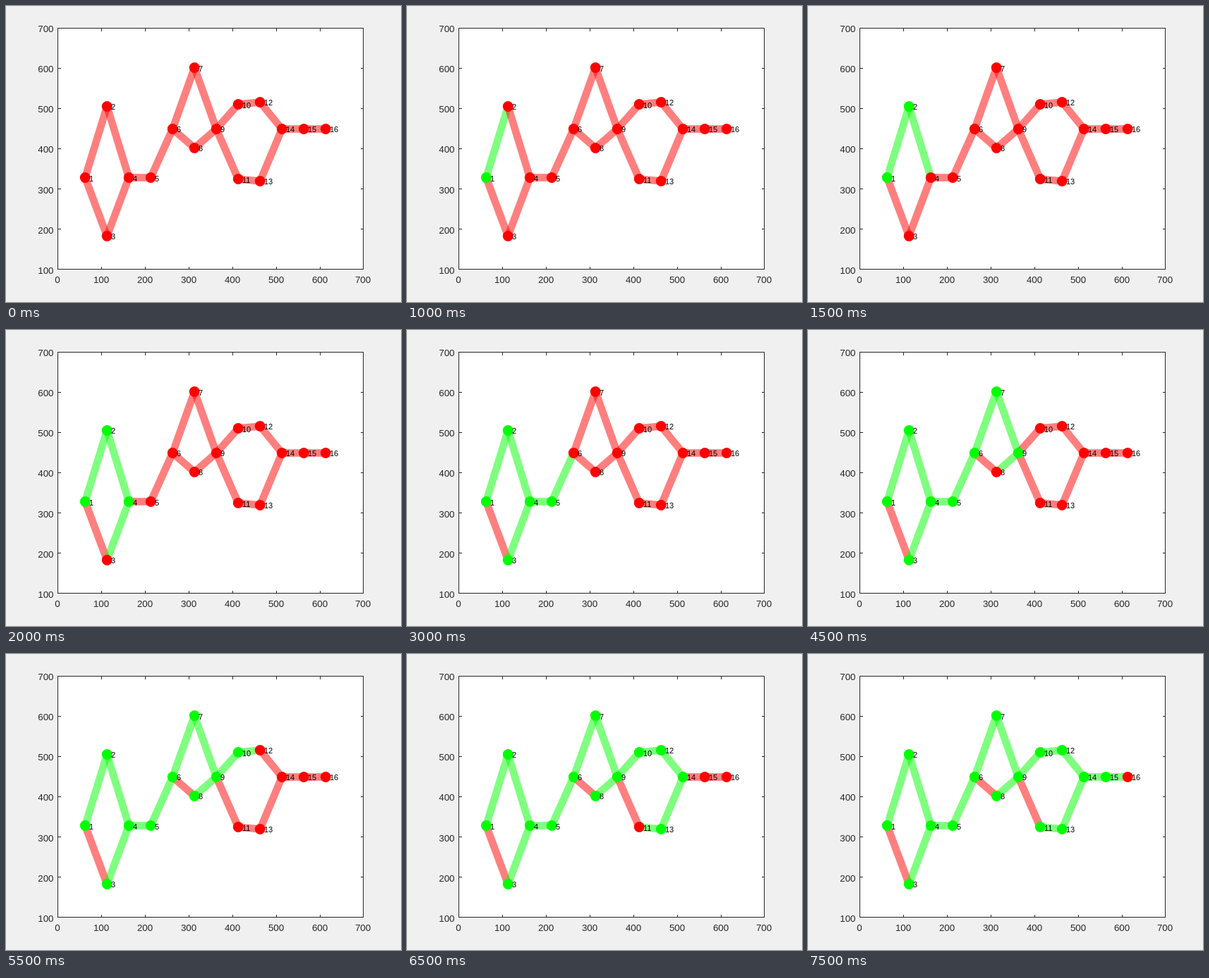
An HTML page that plays this animation: 560x420 px, repeating every 8000 ms.

```html
<!DOCTYPE html>
<html lang="en">
<head>
<meta charset="utf-8">
<title>Graph traversal</title>
<style>
  html, body { margin: 0; width: 100%; height: 100%; overflow: hidden; background: #f0f0f0; }
  svg { display: block; font-family: "Liberation Sans", Arial, sans-serif; }
  .axes { fill: none; stroke: #262626; shape-rendering: crispEdges; }
  .tick { font-size: 13.33px; fill: #262626; }
  .edge { stroke-width: 10.67; stroke-opacity: .5; }
  .label { font-size: 11px; }
</style>
</head>
<body>
<svg width="560" height="420" viewBox="0 0 560 420"></svg>
<script>
const svg = document.querySelector("svg");
const LEFT = 73.5, RIGHT = 506.5, TOP = 31.5, BOTTOM = 373.5, TICK = 4;
const LOOP = 8000, FIRST = 1000, STEP = 500;

// Values in each column: the upper branch, then the lower one if the path is split
const columns = [
  [328], [506, 183], [328], [328], [450], [601, 402],
  [450], [510, 324], [516, 320], [450], [450], [450]
];

function add(tag, attrs, text = "") {
  const el = document.createElementNS("http://www.w3.org/2000/svg", tag);
  for (const name in attrs) el.setAttribute(name, attrs[name]);
  el.textContent = text;
  return svg.appendChild(el);
}

function drawAxes() {
  const width = RIGHT - LEFT, height = BOTTOM - TOP;
  add("rect", { x: LEFT, y: TOP, width, height, fill: "#fff" });
  let path = `M${LEFT} ${TOP}H${RIGHT}V${BOTTOM}H${LEFT}Z`;
  for (let i = 0; i <= 7; i++) {
    const x = LEFT + Math.ceil(width * i / 7);
    path += `M${x} ${TOP}v${TICK}M${x} ${BOTTOM}v${-TICK}`;
    add("text", { class: "tick", x: x - .5, y: 393, "text-anchor": "middle" }, i * 100);
  }
  for (let i = 0; i <= 6; i++) {
    const y = BOTTOM - height * i / 6;
    path += `M${LEFT} ${y}h${TICK}M${RIGHT} ${y}h${-TICK}`;
    add("text", { class: "tick", x: 67.5, y: Math.round(380 - 57.2 * i), "text-anchor": "end" }, 100 + i * 100);
  }
  add("path", { class: "axes", d: path });
}

const grid = columns.map((values, column) => values.map((value, branch) => ({
  x: 112.2 + 31 * column,
  y: BOTTOM - (value - 100) * (BOTTOM - TOP) / 600,
  lower: branch === 1
})));
const nodes = grid.flat();

// The walk follows the upper branch; where the branches meet again it goes
// back along the lower one, whose first node takes a step of its own.
function scheduleNodes() {
  let step = 0, waiting = [];
  for (const [upper, lower] of grid) {
    upper.step = step;
    if (lower) {
      waiting.push(lower);
    } else if (waiting.length) {
      for (const node of waiting) node.step = node.joined = step;
      waiting[0].step = ++step;
      waiting = [];
    }
    step++;
  }
}

function edgeStep(from, to) {
  if (from.lower) return from.joined;
  return to.lower ? Infinity : to.step - 1;
}

drawAxes();
scheduleNodes();

const parts = [];
const centre = y => Math.floor(y) + .5;

grid.slice(1).forEach((column, i) => {
  const parallel = column.length === 2 && grid[i].length === 2;
  for (const from of grid[i]) for (const to of column) {
    if (parallel && from.lower !== to.lower) continue;
    const el = add("line", { class: "edge", x1: from.x, y1: centre(from.y), x2: to.x, y2: centre(to.y) });
    parts.push({ el, step: edgeStep(from, to), paint: "stroke" });
  }
});
for (const { x, y, step } of nodes)
  parts.push({ el: add("circle", { cx: x, cy: centre(y), r: 7.4 }), step, paint: "fill" });
nodes.forEach(({ x, y }, i) =>
  add("text", { class: "label", x: x + 5.8, y: Math.floor(y + 5.5) }, i + 1));

function render(time) {
  const current = Math.floor((time % LOOP - FIRST) / STEP);
  for (const { el, step, paint } of parts)
    el.setAttribute(paint, step <= current ? "#0f0" : "#f00");
}

const start = performance.now();
function tick() {
  render(performance.now() - start);
  requestAnimationFrame(tick);
}
tick();
</script>
</body>
</html>
```
